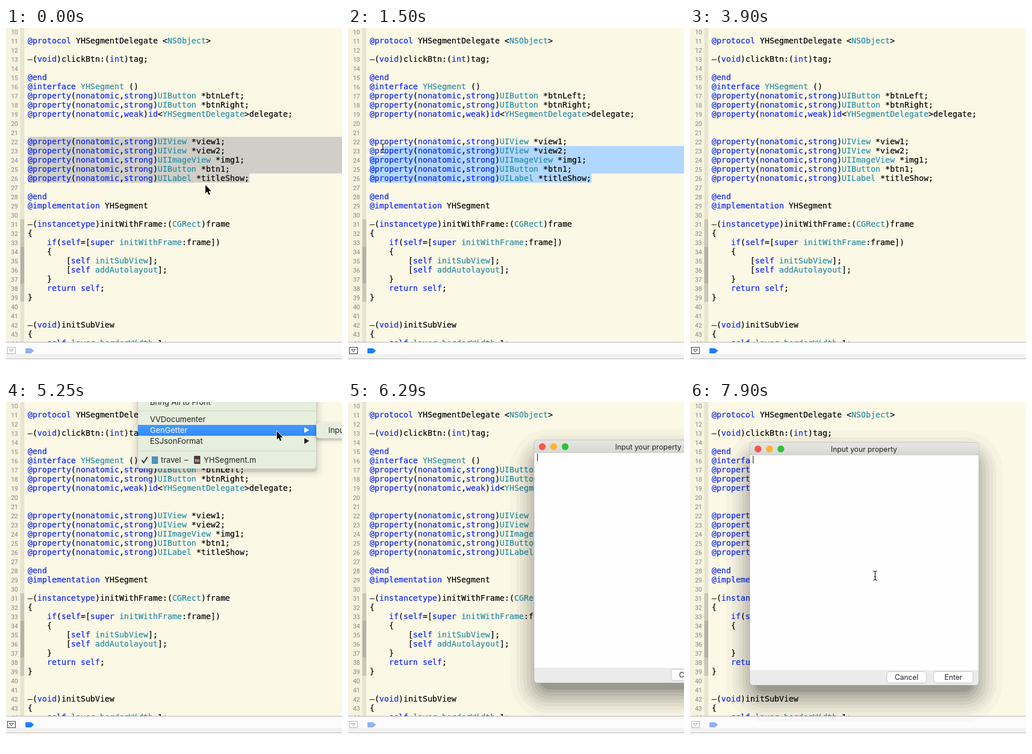
Write an HTML page that moves like this. It is 588 px wide and 604 px high and loops after 8 s.

```html
<!DOCTYPE html>
<html lang="en">
<head>
<meta charset="utf-8">
<title>Code editor</title>
<style>
  html, body { margin: 0; width: 100%; height: 100%; overflow: hidden; background: #fff; }
  svg { display: block; width: 588px; height: 604px; }
  text { white-space: pre; }
  .code { font: 14px "DejaVu Sans Mono", monospace; stroke: #000; stroke-width: .2px; }
  .num { font: 11px Roboto, sans-serif; fill: #868683; text-anchor: end; }
  .menu { font: 13.5px Inter, sans-serif; fill: #222; }
  .ui { font: 12.7px Inter, sans-serif; fill: #222; text-anchor: middle; }
  .kw { fill: #0a24fb; stroke: #0a24fb; }
  .type { fill: #268ba4; stroke: #268ba4; }
</style>
</head>
<body>
<svg id="stage" viewBox="0 0 588 604">
  <defs>
    <linearGradient id="bar" x2="0" y2="1">
      <stop stop-color="#e6e6e4"/><stop offset="1" stop-color="#d6d6d2"/>
    </linearGradient>
    <linearGradient id="blue" x2="0" y2="1">
      <stop stop-color="#4597fd"/><stop offset="1" stop-color="#328bfb"/>
    </linearGradient>
  </defs>
</svg>
<script>
const LOOP = 8000, LEFT = 38, CHAR = 8.428, ROW = 16, FIRST = 10;
const stage = document.getElementById('stage');

function add(parent, tag, attrs = {}, content = '') {
  const el = document.createElementNS('http://www.w3.org/2000/svg', tag);
  for (const key in attrs) el.setAttribute(key, attrs[key]);
  el.textContent = content;
  parent.append(el);
  return el;
}
const group = parent => add(parent, 'g');
const rect = (parent, x, y, width, height, fill, more) =>
  add(parent, 'rect', { x, y, width, height, fill, ...more });
const text = (parent, x, y, cls, content) => add(parent, 'text', { x, y, class: cls }, content);
const path = (parent, d, fill, more) => add(parent, 'path', { d, fill, ...more });
const show = (el, on) => el.setAttribute('visibility', on ? 'visible' : 'hidden');
const move = (el, x, y) => el.setAttribute('transform', `translate(${x} ${y})`);

// Nested translucent plates give the stepped shadow
function shadow(parent, w, h, dy, radius, bands) {
  for (const [s, opacity] of bands)
    rect(parent, -s, dy - s, w + 2 * s, h + 2 * s, '#000',
      { rx: Math.max(radius + s, 2), 'fill-opacity': opacity });
}

// Editor: names between tildes are types or known symbols
const source = `
@protocol YHSegmentDelegate <~NSObject~>

–(void)clickBtn:(int)tag;

@end
@interface ~YHSegment~ ()
@property(nonatomic,strong)~UIButton~ *btnLeft;
@property(nonatomic,strong)~UIButton~ *btnRight;
@property(nonatomic,weak)id<~YHSegmentDelegate~>delegate;


@property(nonatomic,strong)~UIView~ *view1;
@property(nonatomic,strong)~UIView~ *view2;
@property(nonatomic,strong)~UIImageView~ *img1;
@property(nonatomic,strong)~UIButton~ *btn1;
@property(nonatomic,strong)~UILabel~ *titleShow;

@end
@implementation YHSegment

–(instancetype)initWithFrame:(~CGRect~)frame
{
    if(self=[super ~initWithFrame~:frame])
    {
        [self ~initSubView~];
        [self ~addAutolayout~];
    }
    return self;
}


–(void)initSubView
{
    self.~layer~.~borderWidth~=1;`.split('\n');

const token = /(~\w+~|@\w+|\b(?:nonatomic|strong|weak|id|void|int|instancetype|if|self|super|return)\b)/;

rect(stage, 0, 0, 588, 549, '#fbf8e5');
rect(stage, 0, 0, 25, 549, '#f6f3e0');
rect(stage, 25, 0, 7, 549, '#e7e4d0');
rect(stage, 25, 334, 7, 144, '#cbc7b8');
rect(stage, 25, 382, 7, 64, '#b7b2a7');

const lineTop = n => (n - FIRST) * ROW - 2;
const selection = [22, 23, 24, 25, 26].map(n => rect(stage, LEFT, lineTop(n), 0, ROW, '#b2d7ff'));

source.forEach((line, i) => {
  const y = 11 + i * ROW;
  text(stage, 21, y, 'num', FIRST + i);
  const row = text(stage, LEFT, y, 'code', '');
  line.split(token).forEach((part, k) => {
    const cls = k % 2 ? (part[0] === '~' ? 'type' : 'kw') : '';
    add(row, 'tspan', { class: cls }, part.replaceAll('~', ''));
  });
});

// Debug bar
rect(stage, 0, 548, 588, 56, '#fff');
rect(stage, 0, 548, 588, 1, '#b4b4b4');
rect(stage, 0, 549, 588, 20, '#fcfcfc');
rect(stage, 0, 569, 588, 8, '#f1f1f1');
rect(stage, 0, 577, 588, 1, '#b8b8b8');
const toggle = rect(stage, 2.5, 557.5, 14, 11, '#fff');
const toggleMark = path(stage, 'M6 561h7l-3.5 4.5z', 'none');
const flag = path(stage, 'M35 559h8q1 0 2 1l4 3.5-4 3.5q-1 1-2 1h-8q-1 0-1-1v-7q0-1 1-1z');

// Window menu
const PANEL = '#e6eede';
const menu = group(stage);
const menuShade = group(menu);
move(menuShade, 231, -20);
shadow(menuShade, 312, 136, 5, 5, [[12, .02], [8, .03], [4, .05], [1, .1]]);
rect(menu, 231, -20, 312, 136, PANEL, { rx: 5 });
for (const y of [15, 85]) rect(menu, 231, y, 312, 1, '#cfd6c9');

function menuItem(parent, x, label, y, width, arrow) {
  const item = group(parent);
  const back = rect(item, x, y - 9, width, 19, 'url(#blue)');
  const words = text(item, x + 21, y + 5, 'menu', label);
  const tip = arrow && path(item, `M${x + 291} ${y - 5}l8.5 5-8.5 5z`);
  return on => {
    show(back, on);
    words.style.fill = on ? '#fff' : '#222';
    if (tip) tip.setAttribute('fill', on ? '#fff' : '#222');
  };
}
const items = [['Bring All to Front', 0], ['VVDocumenter', 30], ['GenGetter', 49, true], ['ESJsonFormat', 68, true]]
  .map(([label, y, arrow]) => menuItem(menu, 231, label, y, 312, arrow));

path(menu, 'M237.5 101.500l3.500 4.500 6.500-10', 'none', { stroke: '#222', 'stroke-width': 1.8 });
rect(menu, 255, 95, 11, 13, '#4c93bd');
text(menu, 271, 106, 'menu', 'travel');
text(menu, 312, 106, 'menu', '–');
rect(menu, 329, 94, 11, 14, '#493b42', { rx: 1 });
text(menu, 334.5, 105, 'ui', 'm').style.cssText = 'font-size:9px;font-weight:700;fill:#e6c9d2';
text(menu, 346, 106, 'menu', 'YHSegment.m');

const submenu = group(stage);
const subShade = group(submenu);
move(subShade, 543, 36);
shadow(subShade, 160, 27, 3, 5, [[6, .03], [3, .05], [1, .1]]);
rect(submenu, 543, 36, 160, 27, PANEL, { rx: 5 });
const subItem = menuItem(submenu, 543, 'Input property', 49, 160);

// Input window
const dialog = group(stage);
shadow(dialog, 400, 423, 22, 26,
  [[42, .02], [31, .03], [25, .03], [19, .04], [13, .05], [7, .05], [1, .06], [-5, .08], [-10, .1]]);
rect(dialog, -.5, -.5, 401, 424, '#b2b2ac', { rx: 5 });
rect(dialog, 0, 0, 400, 423, '#ebebeb', { rx: 5 });
path(dialog, 'M0 22V5q0-5 5-5h390q5 0 5 5v17z', 'url(#bar)');
rect(dialog, 0, 21.5, 400, .7, '#c6c6c4');
rect(dialog, 0, 22, 400, 375, '#fefefe');
['#fc544d', '#fdb52f', '#2bc437'].forEach((fill, i) =>
  add(dialog, 'circle', { cx: 14 + 20 * i, cy: 11, r: 6, fill }));
text(dialog, 199.5, 16, 'ui', 'Input your property');
rect(dialog, 5, 23, 1, 13, '#000');
[['Cancel', 239], ['Enter', 321]].forEach(([label, x]) => {
  rect(dialog, x + .5, 399.5, 69, 20, '#fff', { rx: 4, stroke: '#c3c3c3' });
  text(dialog, x + 35, 414, 'ui', label);
});

// Pointers
const outline = { stroke: '#fff', 'stroke-width': 1.6, 'paint-order': 'stroke' };
const pointers = {
  arrow: path(stage, 'M0 0V14.500L3.300 11.500 5.600 17 8 16 5.700 10.700H10.200Z', '#000', outline),
  beam: path(stage, 'M-3.500-8Q0-8 0-5.500Q0-8 3.500-8M0-6V6M-3.500 8Q0 8 0 5.500Q0 8 3.500 8M-2 2H2', 'none',
    { stroke: '#111', 'stroke-width': 1.2 })
};

// Tables of steps; each row holds until the next
const pointerSteps = [
  [0, 'arrow', 349, 274], [300, 'beam', 366, 270], [450, 'beam', 381, 267], [600, 'beam', 389, 265],
  [750, 'beam', 410, 264], [900, 'beam', 427, 263], [1050, 'beam', 372, 256], [1200, 'beam', 245, 240],
  [1350, 'beam', 128, 222], [1500, 'beam', 61, 210], [1650, 'beam', 42, 204], [1800, 'beam', 28, 200],
  [1950, 'beam', 22, 199], [2100, 'beam', 30, 200], [2250, 'beam', 38, 200], [2400, 'beam', 143, 105],
  [2550, ''], [4950, 'arrow', 446, 1], [5100, 'arrow', 463, 30], [5250, 'arrow', 474, 51],
  [5400, 'arrow', 525, 50], [5550, 'arrow', 572, 50], [6000, ''],
  [7020, 'arrow', 532, 78], [7170, 'arrow', 460, 80], [7320, 'arrow', 422, 81], [7460, 'arrow', 415, 84],
  [7610, 'beam', 372, 180], [7760, 'beam', 335, 272], [7900, 'beam', 324, 303]
];
const dialogSteps = [
  [6150, 326, 67], [6730, 318, 67], [6880, 284, 68], [7020, 218, 69], [7170, 146, 70], [7320, 108, 71], [7460, 105, 71]
];
const hoverSteps = [[4500, -1], [4950, 0], [5100, 1], [5250, 2]];
const at = (steps, t) => steps.findLast(step => step[0] <= t);

function drawSelection(t, x, y) {
  const dragging = t >= 900 && t < 2400;
  const first = dragging ? Math.max(22, FIRST + Math.floor((y + 2) / ROW)) : 22;
  const start = dragging ? Math.max(LEFT, LEFT + Math.round((x - LEFT) / CHAR) * CHAR) : LEFT;
  selection.forEach((bar, i) => {
    const n = 22 + i, x0 = n === first ? start : LEFT, x1 = n === 26 ? 426 : 588;
    bar.setAttribute('x', x0);
    bar.setAttribute('width', t < 3900 && n >= first ? Math.max(0, x1 - x0) : 0);
    bar.setAttribute('fill', t < 300 ? '#d0cfc7' : '#b2d7ff');
  });
}

function draw(t) {
  const [, kind, x, y] = at(pointerSteps, t);
  for (const name in pointers) show(pointers[name], name === kind);
  if (kind) move(pointers[kind], x, y);
  drawSelection(t, x, y);

  const active = t >= 300 && t < 6150;
  toggle.setAttribute('stroke', active ? '#333' : '#b0b0b0');
  toggleMark.setAttribute('stroke', active ? '#333' : '#a0a0a0');
  flag.setAttribute('fill', active ? '#1a80fb' : '#8cb4f3');

  const open = t >= 4500 && t < 6000, nested = open && t >= 5250;
  menu.style.display = open ? '' : 'none';
  submenu.style.display = nested ? '' : 'none';
  const hover = open ? at(hoverSteps, t)[1] : -1;
  items.forEach((highlight, i) => highlight(i === hover));
  // Hidden parts must not keep a visible child
  subItem(nested && t >= 5550);

  const place = at(dialogSteps, t);
  dialog.style.display = place ? '' : 'none';
  if (place) move(dialog, place[1], place[2]);
}

const began = performance.now();
function tick() {
  draw((performance.now() - began) % LOOP);
  requestAnimationFrame(tick);
}
tick();
</script>
</body>
</html>
```
